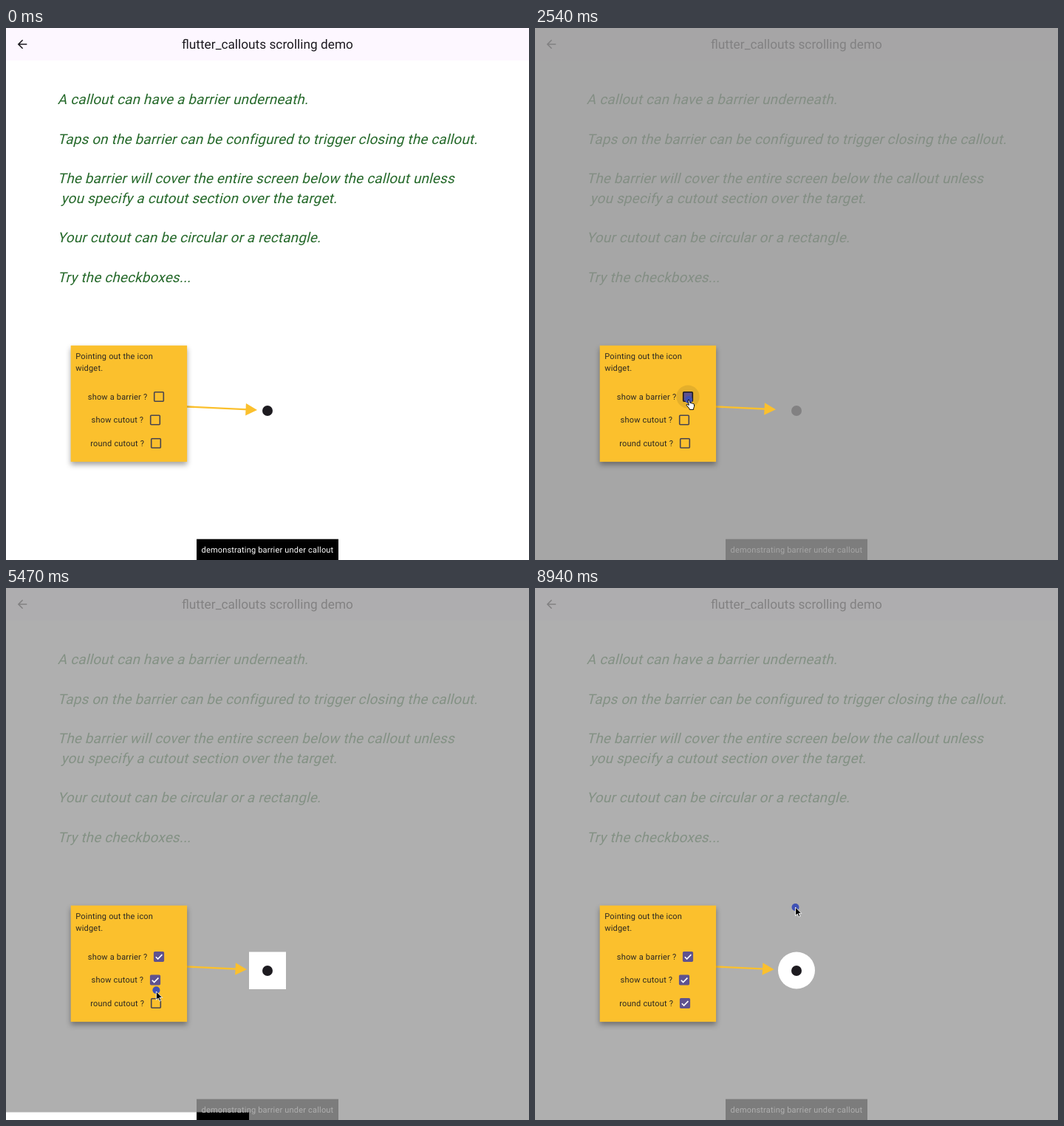
An HTML page for the animation above (9230 ms loop, 708 by 720 pixels).

```html
<!DOCTYPE html>
<html lang="en">
<head>
<meta charset="utf-8">
<title>Callout barrier demo</title>
<style>
  html, body { margin: 0; width: 100%; height: 100%; overflow: hidden; background: #fff; }
  svg { display: block; width: 708px; height: 720px; font-family: Roboto, sans-serif; }
  text { text-rendering: geometricPrecision; }
  .title { font-size: 17.27px; fill: #1d1b20; }
  .intro { font-size: 18.84px; letter-spacing: .196px; fill: #25692a; }
  .body { font-size: 10.99px; letter-spacing: .196px; fill: #2a2622; }
  .body.light { fill: #fff; }
  .card { filter: drop-shadow(0 4px 3.5px rgba(0, 0, 0, .36)); }
</style>
</head>
<body>
<svg id="stage" viewBox="0 0 708 720">
  <rect width="708" height="720" fill="#fff"/>
  <rect width="708" height="44" fill="#fdf7ff"/>
  <path transform="translate(12.6 12.6) scale(.785)" fill="#1d1b20"
    d="M20 11H7.83l5.59-5.59L12 4l-8 8 8 8 1.41-1.41L7.83 13H20z"/>
  <text class="title" x="238" y="27.5">flutter_callouts scrolling demo</text>
  <g id="intro" class="intro"></g>
  <circle cx="354" cy="518" r="7" fill="#1d1b20"/>
  <rect x="258" y="691.7" width="192" height="28.3" fill="#000"/>
  <text class="body light" x="264.5" y="709.6">demonstrating barrier under callout</text>

  <path id="barrier" fill-rule="evenodd"/>

  <path id="shaft" stroke="#fbc02d" stroke-width="2.4"/>
  <path id="head" fill="#fbc02d" d="M0 0L-15.5-8.3L-15.5 8.3Z"/>
  <rect class="card" x="87.7" y="429.7" width="157.4" height="157.4" fill="#fbc02d"/>
  <text class="body" x="94.3" y="448">Pointing out the icon</text>
  <text class="body" x="94.3" y="463.6">widget.</text>
  <g id="rows"></g>

  <circle id="dot" r="5" fill="#3f51b5"/>
  <g id="cursor" stroke-linejoin="round">
    <path id="pointer" fill="#000" stroke="#fff" stroke-width=".9"
      d="M0 0V11.6L2.7 9.1L4.6 13.2L6.5 12.3L4.6 8.4H8.3Z"/>
    <path id="hand" fill="#fff" stroke="#000" stroke-width="1"
      d="M-1 .8Q0-.8 1 .8L1.9 4.4Q3.2 3.5 3.8 5Q5.2 4.2 5.7 5.5Q7.2 5 7.5 6.8
         Q8 9.5 6.7 11.6L6.6 13.4H1.2L.8 11.8L-2.8 7.7Q-3.3 6-1.4 6.5L.3 7.4Z"/>
  </g>
</svg>
<script>
const LOOP = 9230;
const SHOW = 2440, CUT = 4700, ROUND = 6900;
const $ = id => document.getElementById(id);
const clamp = v => Math.max(0, Math.min(1, v));

function add(parent, tag, attrs, text = '') {
  const el = document.createElementNS('http://www.w3.org/2000/svg', tag);
  for (const k in attrs) el.setAttribute(k, attrs[k]);
  el.textContent = text;
  return parent.appendChild(el);
}

// Line slot, indent, text; slanted upright letters, as a synthetic oblique
[
  [0, 0, 'A callout can have a barrier underneath.'],
  [2, 0, 'Taps on the barrier can be configured to trigger closing the callout.'],
  [4, 0, 'The barrier will cover the entire screen below the callout unless'],
  [5, 4.8, 'you specify a cutout section over the target.'],
  [7, 0, 'Your cutout can be circular or a rectangle.'],
  [9, 0, 'Try the checkboxes...']
].forEach(([n, dx, s]) => add($('intro'), 'text', {
  transform: `translate(${69.8 + dx} ${103.2 + 26.72 * n}) skewX(-14)`
}, s));

const boxes = [
  ['show a barrier ?', 110.8, 207, 499, SHOW],
  ['show cutout ?', 115.6, 202, 530.5, CUT],
  ['round cutout ?', 114.3, 203, 562, ROUND]
].map(([label, tx, x, y, at]) => {
  const rows = $('rows');
  add(rows, 'text', { class: 'body', x: tx, y: y + 3.8 }, label);
  const halo = add(rows, 'circle', { cx: x, cy: y, r: 15.6, fill: '#1d1b20', 'fill-opacity': .1 });
  const g = add(rows, 'g', { transform: `translate(${x} ${y})` });
  const frame = add(g, 'rect', { x: -6.3, y: -6.3, width: 12.6, height: 12.6, rx: 1, 'stroke-width': 1.6 });
  const tick = add(g, 'path', {
    d: 'M-4.2 .2L-1.4 3L4.4-2.9', fill: 'none', stroke: '#fff', 'stroke-width': 1.6,
    pathLength: 1, 'stroke-dasharray': '1 2'
  });
  return { x, y, at, halo, frame, tick };
});

const linear = p => p;
const easeOut = p => 1 - (1 - p) ** 2;
const smooth = p => p * p * (3 - 2 * p);

// Time, x, y, easing towards the next stop
const path = [
  [1110, 455, 225, linear],
  [1330, 336.7, 374.3, easeOut],
  [1900, 208, 503, linear],
  [3000, 208, 503, smooth],
  [3700, 204, 531, linear],
  [5200, 204, 531, smooth],
  [5800, 202.5, 566, linear],
  [7100, 202.5, 566, smooth],
  [7840, 318, 596, linear],
  [8000, 318, 596, smooth],
  [8900, 352.5, 432, linear],
  [LOOP, 352.5, 432, linear]
];

function mouseAt(t) {
  t = Math.max(t, path[0][0]);
  const i = path.findIndex((p, n) => n === path.length - 2 || t < path[n + 1][0]);
  const [t0, x0, y0, ease] = path[i], [t1, x1, y1] = path[i + 1];
  const p = ease(clamp((t - t0) / (t1 - t0)));
  return [x0 + (x1 - x0) * p, y0 + (y1 - y0) * p];
}

const show = (el, on) => el.setAttribute('visibility', on ? 'visible' : 'hidden');
const move = (el, x, y, rest = '') => el.setAttribute('transform', `translate(${x} ${y}) ${rest}`);

function drawBarrier(t) {
  const b = $('barrier');
  let d = 'M0 0H708V720H0Z';
  if (t >= ROUND) d += 'M329 517.5a25 25 0 1 0 50 0a25 25 0 1 0-50 0Z';
  else if (t >= CUT) d = 'M0 0H708V720H329V709.5H0ZM329 492.5H379V543H329Z';
  b.setAttribute('d', d);
  b.setAttribute('fill', t < CUT ? 'rgb(150,150,150)' : 'rgb(155,155,155)');
  b.setAttribute('opacity', t < CUT ? .84 * clamp((t - SHOW) / 90) : .8);
}

function drawArrow(t) {
  const x = t < SHOW ? 340 : t < ROUND ? 326 : 323.5;
  const y = 512.5 + (x - 245) * .047;
  $('shaft').setAttribute('d', `M245 512.5L${x - 12} ${y - .6}`);
  move($('head'), x, y, 'rotate(2.7)');
}

function drawBox(b, t, mx, my, active) {
  const hover = active && Math.hypot(mx - b.x, my - b.y) < 15;
  const p = clamp((t - b.at) / 200);
  show(b.halo, hover);
  b.frame.setAttribute('fill', '#5f528f');
  b.frame.setAttribute('fill-opacity', clamp(p * 2));
  b.frame.setAttribute('stroke', p >= .6 ? '#5f528f' : hover ? '#1d1b20' : '#49454f');
  show(b.tick, p > .5);
  b.tick.setAttribute('stroke-dashoffset', 1 - clamp(p * 2 - 1));
  return hover;
}

function draw(t) {
  const active = t >= path[0][0];
  const [x, y] = mouseAt(t);
  drawBarrier(t);
  drawArrow(t);
  const over = boxes.map(b => drawBox(b, t, x, y, active)).some(Boolean);
  show($('dot'), active);
  show($('pointer'), active && !over);
  show($('hand'), active && over);
  move($('dot'), ...mouseAt(t - 20));
  move($('cursor'), x, y);
}

const start = performance.now();
function tick(now) {
  draw(Math.max(0, now - start) % LOOP);
  requestAnimationFrame(tick);
}
draw(0);
requestAnimationFrame(tick);
</script>
</body>
</html>
```
